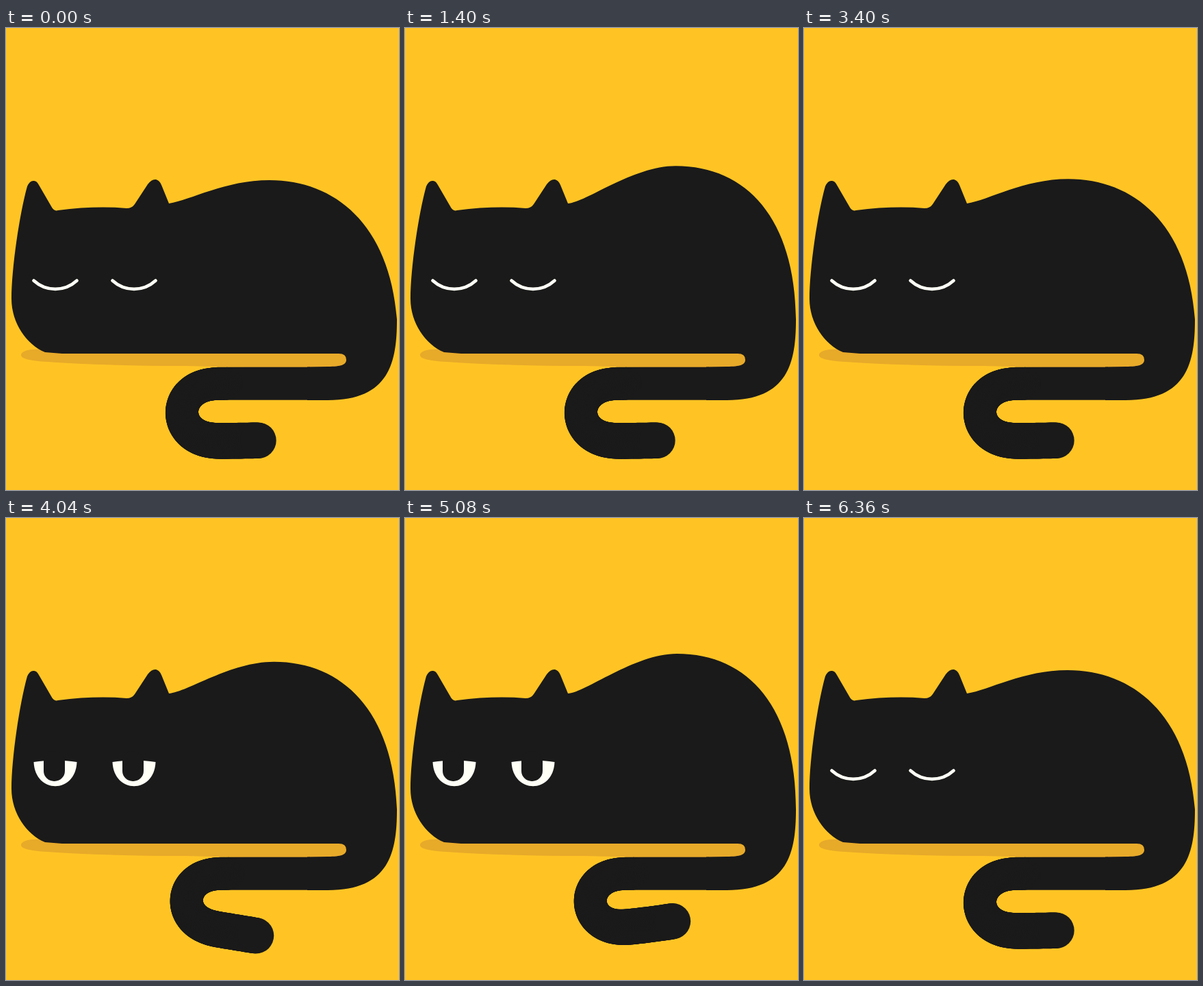
These frames come from a looping animation (574 by 674 pixels, 6400 ms). An HTML page with a canvas:

```html
<!DOCTYPE html>
<html lang="en">
<head>
<meta charset="utf-8">
<title>Sleepy cat</title>
<style>
  html, body { margin: 0; width: 100%; height: 100%; overflow: hidden; background: #ffc424; }
  canvas { display: block; }
</style>
</head>
<body>
<canvas id="stage" width="574" height="674"></canvas>
<script>
const ctx = document.getElementById('stage').getContext('2d');
const LOOP = 6400, BREATH = 3200, INHALE = 1960;
const BLACK = '#1a1a1a', YELLOW = '#ffc424', SHADE = '#e8aa29', WHITE = '#fffff6';

const lerp = (a, b, k) => a + (b - a) * k;
const mix = (a, b, k) => a.map((v, i) => lerp(v, b[i], k));
const ramp = (v, from, to) => {
  const k = Math.min(1, Math.max(0, (v - from) / (to - from)));
  return k * k * (3 - 2 * k);
};

// 0 = empty lungs, 1 = full; a quick start in, then a shorter way out
const breath = t => t < INHALE
  ? ramp((t / INHALE) ** .8, 0, 1)
  : 1 - ramp(t, INHALE, BREATH);

// Two curves: ear to top of the back, top of the back to the rump
const EXHALED = [270, 251, 320, 222, 385, 222, 480, 222, 560, 286, 571, 425];
const INHALED = [262, 256, 335, 198, 397, 198, 503, 198, 571, 278, 571, 425];

const REST_OF_BODY = `C571,488 560,543 470,543 L440,543 L440,494.5 L470,494
  C490,494 497,491 497,484 Q497,475 486,475 L82,475 L57,473
  C30,462 8,430 8,395 C8,350 20,270 31,231
  Q35,222 41,223 Q45,223 48,229 L66,260 Q70,268 76,266
  Q130,259 176,263 Q184,263 188,257 L207,228
  Q213,220 219,221 Q224,222 227,229 Z`;

const SHADOW = new Path2D(`M60,468 L38,469 Q21,471 22,478 Q24,485 60,487
  Q150,493 260,493 L440,497 L500,497 L500,470 Z`);

// Tail poses: x where the bend starts, bend in degrees, bend length, whole length, tip bend
const CURLED = [322, 180, 173, 221, 1];
const STRETCHED = [362, 27, 80, 211, -13];
const TIGHT = [333, 183, 168, 225, 6];

function drawTail(t) {
  const out = ramp(t, 3970, 4440), back = ramp(t, 4600, 5050);
  let pose = mix(CURLED, STRETCHED, out);
  pose = mix(pose, TIGHT, back);
  pose = mix(pose, CURLED, ramp(t, 5090, 5420));
  const [root, bend, bendLength, length, tip] = pose;
  // The tail looks shorter while it swings towards the viewer
  const reach = length * (1 - .34 * Math.sin(Math.PI * out) - .28 * Math.sin(Math.PI * back));

  ctx.fillRect(root, 494.7, 444 - root, 48);
  const steps = 120;
  let x = root, y = 518.7;
  for (let n = 0; n <= steps; n++) {
    const u = n / steps;
    ctx.beginPath();
    ctx.arc(x, y, lerp(24, 26.3, ramp(u, .35, .75)), 0, 7);
    ctx.fill();
    const heading = (bend * ramp(u, 0, bendLength / length) + tip * u * u) * Math.PI / 180;
    x -= Math.cos(heading) * reach / steps;
    y += Math.sin(heading) * reach / steps;
  }
}

function drawEye(x, open) {
  const [side, low, lid, inset, lidInset] =
    mix([368.5, 385, 385, 18, 18], [356, 403, 352.5, 2, 20], open);
  const right = x + 63;
  ctx.beginPath();
  ctx.moveTo(x, side);
  ctx.bezierCurveTo(x + inset, low, right - inset, low, right, side);
  ctx.bezierCurveTo(right - lidInset, lid, x + lidInset, lid, x, side);
  ctx.fillStyle = ctx.strokeStyle = WHITE;
  ctx.fill();
  if (open < 1) {
    ctx.lineWidth = 4.7 * (1 - open);
    ctx.lineCap = ctx.lineJoin = 'round';
    ctx.stroke();
  }
  if (open > 0) {
    ctx.fillStyle = BLACK;
    ctx.beginPath();
    ctx.roundRect(x + 14.5, 340, 31, lerp(30, 44, open), 15);
    ctx.fill();
  }
}

function draw(t) {
  ctx.fillStyle = YELLOW;
  ctx.fillRect(0, 0, 574, 674);
  ctx.fillStyle = SHADE;
  ctx.fill(SHADOW);
  ctx.fillStyle = BLACK;
  const back = mix(EXHALED, INHALED, breath(t % BREATH));
  ctx.fill(new Path2D(`M238,256 C${back.join(' ')} ${REST_OF_BODY}`));
  drawTail(t);
  const open = ramp(t, 3700, 3900) - ramp(t, 5600, 5800);
  drawEye(40.5, open);
  drawEye(155.5, open);
}

const start = performance.now();
function tick() {
  draw((performance.now() - start) % LOOP);
  requestAnimationFrame(tick);
}
tick();
</script>
</body>
</html>
```
